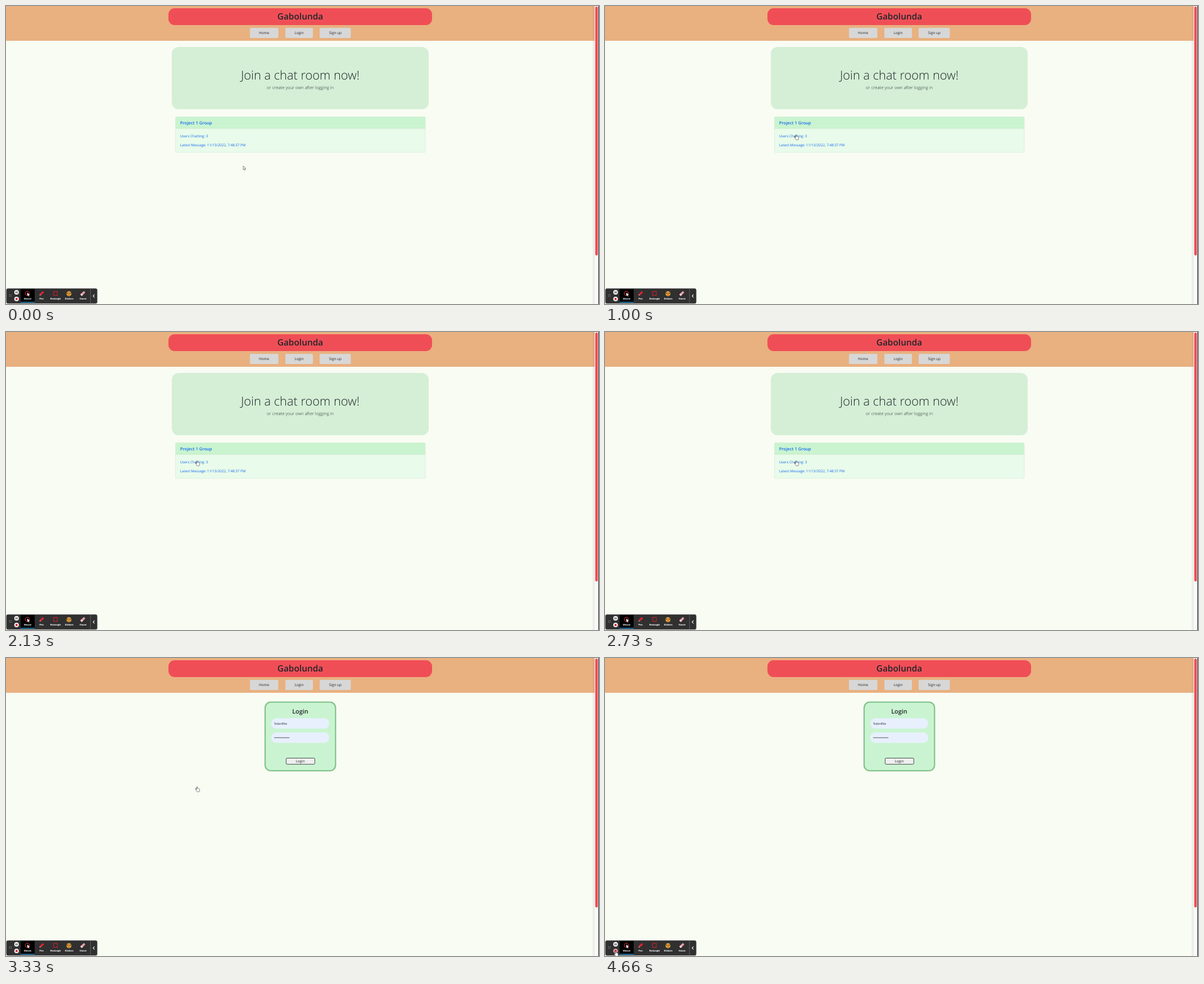
Write an HTML page that moves like this. It is 1055x531 px and loops after 4730 ms.

```html
<!DOCTYPE html>
<html lang="en">
<head>
<meta charset="utf-8">
<title>Chat rooms</title>
<style>
  html, body { margin: 0; width: 100%; height: 100%; overflow: hidden; background: #f9fcf3; }
  svg { display: block; width: 1055px; height: 531px; }
  text { font-family: "Open Sans", "Noto Sans", sans-serif; font-size: 6.4px; fill: #212529; text-rendering: geometricPrecision; }
  .mid { text-anchor: middle; }
  .semi { font-weight: 600; }
  .light { font-weight: 300; }
  .link text { fill: #1469f2; font-size: 6.25px; }
  .link .semi { font-size: 7.6px; }
  .field { font-size: 5.4px; }
  .hint { fill: #7b7468; }
  .tool text { font-family: Roboto, Inter, sans-serif; font-weight: 700; font-size: 4.2px; fill: #fff; text-anchor: middle; }
</style>
</head>
<body>
<svg viewBox="0 0 1055 531">
  <defs>
    <linearGradient id="edge">
      <stop offset="0" stop-color="#777" stop-opacity="0"/>
      <stop offset="1" stop-color="#777" stop-opacity=".16"/>
    </linearGradient>
  </defs>
  <rect width="1055" height="531" fill="#f9fcf3"/>

  <!-- header -->
  <rect width="1047.5" height="62" fill="#e9b080"/>
  <rect x="289" y="4" width="469" height="30" rx="11" fill="#f04e57"/>
  <text class="mid semi" x="523.5" y="23.6" style="font-size:15.4px">Gabolunda</text>
  <g fill="#d7d7d7">
    <rect x="434" y="39" width="50.5" height="18" rx="2"/>
    <rect x="497" y="39" width="49" height="18" rx="2"/>
    <rect x="558" y="39" width="55.5" height="18" rx="2"/>
  </g>
  <g class="mid">
    <text x="459" y="50.2">Home</text>
    <text x="521.5" y="50.2">Login</text>
    <text x="585.8" y="50.2">Sign up</text>
  </g>

  <g id="home">
    <rect x="295" y="73" width="457" height="111" rx="12" fill="#d4efd6"/>
    <text class="mid light" x="523.5" y="131" style="font-size:21.8px">Join a chat room now!</text>
    <text class="mid light" x="523.6" y="148.2" style="font-size:7.75px">or create your own after logging in</text>
    <g class="link">
      <rect x="301.5" y="197.5" width="444.5" height="63.5" rx="1.5" fill="#e9fbea" stroke="#d9ead9" stroke-width=".7"/>
      <path d="M301.5 218V199q0-1.5 1.5-1.5H744.5q1.5 0 1.5 1.5V218Z" fill="#caf4cf"/>
      <path d="M301.5 218H746" stroke="#bfe2c4" stroke-width=".7"/>
      <text class="semi" x="309.8" y="211">Project 1 Group</text>
      <text x="309.8" y="233.6">Users Chatting: 3</text>
      <text x="309.8" y="250.1">Latest Message: 11/13/2022, 7:48:37 PM</text>
    </g>
  </g>

  <g id="login">
    <rect x="461" y="78.7" width="125.3" height="122.2" rx="10" fill="#caf4d1" stroke="#83c48d" stroke-width="2.3"/>
    <text class="mid semi" x="523.5" y="99.3" style="font-size:10.9px">Login</text>
    <g id="inputs">
      <rect x="472" y="107.3" width="103" height="18.5" rx="9"/>
      <rect x="472" y="132.7" width="103" height="18.5" rx="9"/>
    </g>
    <g id="empty">
      <text class="field hint" x="476.7" y="118.7">Username</text>
      <text class="field hint" x="476.7" y="144.1">Password</text>
    </g>
    <g id="filled">
      <text class="field" x="476.7" y="118.8">TobinRVe</text>
      <path d="M478 142H503.6" stroke="#222" stroke-width="1.5" stroke-linecap="round" stroke-dasharray="0 2.1"/>
    </g>
    <rect x="498.4" y="178.4" width="51" height="10.9" rx="1.8" fill="#efefef" stroke="#333" stroke-width=".9"/>
    <text class="mid" x="523.5" y="186.2">Login</text>
  </g>

  <!-- scrollbar -->
  <rect x="1042" width="5.5" height="531" fill="url(#edge)"/>
  <rect x="1047.5" width="7" height="531" fill="#fbfbfb"/>
  <rect x="1048.3" y="1" width="4.7" height="443.5" rx="2.3" fill="#f04e57"/>
  <rect x="1054" width="1" height="531" fill="#111"/>

  <!-- recorder toolbar -->
  <g class="tool">
    <rect x=".8" y="503.5" width="161.4" height="26.5" rx="2.5" fill="#303031" stroke="#555" stroke-width=".6"/>
    <path d="M6.3 514.5v5M9 514.5v5" stroke="#ccc" stroke-width="1.2" stroke-linecap="round" stroke-dasharray="0 2.5"/>
    <circle cx="18.8" cy="510.2" r="4.1" fill="#f3f3f3"/>
    <path d="M17.6 508.4v3.6M20 508.4v3.6" stroke="#333" stroke-width="1.1"/>
    <circle id="stop" cx="18.8" cy="522" r="4.1" fill="#f3f3f3"/>
    <rect x="17" y="520.2" width="3.6" height="3.6" rx=".5" fill="#d3222f"/>
    <rect x="26" y="504" width="25" height="25" fill="#000"/>
    <rect x="26" y="527.3" width="25" height="1.4" fill="#2d9fe0"/>
    <circle cx="38" cy="512" r="3.7" fill="none" stroke="#d62f3d" stroke-width="1.1"/>
    <path d="M38 510.6v6l1.5-1.2 1.1 2 .9-.5-1-1.9 1.8-.2Z" fill="#fff"/>
    <g transform="translate(63.3 512.3) rotate(-45)">
      <rect x="-3" y="-1.7" width="7.5" height="3.4" rx=".5" fill="#dc2432"/>
      <path d="M-3-1.7-5.2 0-3 1.7Z" fill="#ef8a83"/>
    </g>
    <rect x="84.7" y="508.6" width="6.6" height="7" fill="none" stroke="#c9202d" stroke-width="1.1"/>
    <circle cx="112" cy="512.7" r="4.4" fill="#f0ad36"/>
    <path d="M108.4 511.7h7.2" stroke="#693e26" stroke-width="1.7" stroke-dasharray="3 1.2"/>
    <path d="M109.7 514.2q2.3 2.5 4.6 0" fill="none" stroke="#7c3c20" stroke-width=".9"/>
    <g transform="translate(136.7 512.3) rotate(-45)">
      <rect x="-4.5" y="-1.9" width="9" height="3.8" rx=".8" fill="#e99ba3"/>
      <rect x="-4.5" y="-1.9" width="3" height="3.8" rx=".8" fill="#f5d2d5"/>
    </g>
    <text x="38.5" y="523">Mouse</text>
    <text x="63.2" y="523">Pen</text>
    <text x="88.2" y="523">Rectangle</text>
    <text x="112.5" y="523">Stickers</text>
    <text x="137.3" y="523">Eraser</text>
    <path d="M150.3 504v25.5" stroke="#777" stroke-width=".7"/>
    <path d="M157.4 514.2 155 516.8l2.4 2.6" fill="none" stroke="#fff" stroke-width="1.1"/>
  </g>

  <g id="cursor" fill="#fff" stroke="#333" stroke-width=".6" stroke-linejoin="round">
    <path id="arrow" d="M0 0v6.6l1.5-1.3 1.1 2.3 1.1-.5-1-2.3 2.1-.2Z"/>
    <path id="hand" d="M-.7.6Q0-.4.7.6V3.2l1.2.2 1.1.4 1 .4q.8.4.7 1.4L4.2 8.2 3.7 9.4H.1L-1.9 6.7-2.7 5.2Q-2-.0 -2 4.6L-.7 5.6Z"/>
  </g>
</svg>
<script>
  const LOOP = 4730, STEPS = 71, STEP = LOOP / STEPS;
  const LOGIN_AT = 2795, FILL_AT = 2925;
  // time, x, y of the pointer tip
  const path = [
    [0, 422, 285], [130, 422, 285], [530, 352, 258], [860, 340, 229],
    [3660, 340, 229], [4450, 19, 522], [LOOP, 19, 522]
  ];
  const el = id => document.getElementById(id);
  const show = (id, on) => el(id).style.display = on ? "" : "none";
  const ease = u => u * u * (3 - 2 * u);

  function pointer(t) {
    const i = path.findIndex((p, k) => k > 0 && t <= p[0]);
    const [t0, x0, y0] = path[i - 1], [t1, x1, y1] = path[i];
    const u = ease((t - t0) / (t1 - t0));
    return [x0 + (x1 - x0) * u, y0 + (y1 - y0) * u];
  }

  function draw(t) {
    const [x, y] = pointer(t);
    const login = t >= LOGIN_AT, filled = t >= FILL_AT;
    const onStop = Math.hypot(x - 18.8, y - 522) < 5;
    const onCard = y < 262 && t < 3700;
    const hand = onCard || onStop;
    show("home", !login);
    show("login", login);
    show("empty", !filled);
    show("filled", filled);
    show("hand", hand);
    show("arrow", !hand);
    el("inputs").setAttribute("fill", filled ? "#e8f0fe" : "#e9b080");
    el("stop").setAttribute("fill", onStop ? "#d8a5a8" : "#f3f3f3");
    el("cursor").setAttribute("transform", `translate(${x} ${y})`);
  }

  const start = performance.now();
  function tick() {
    const t = (performance.now() - start) % LOOP;
    draw(Math.min(STEPS - 1, Math.floor((t + 7) / STEP)) * STEP);
    requestAnimationFrame(tick);
  }
  tick();
</script>
</body>
</html>
```
